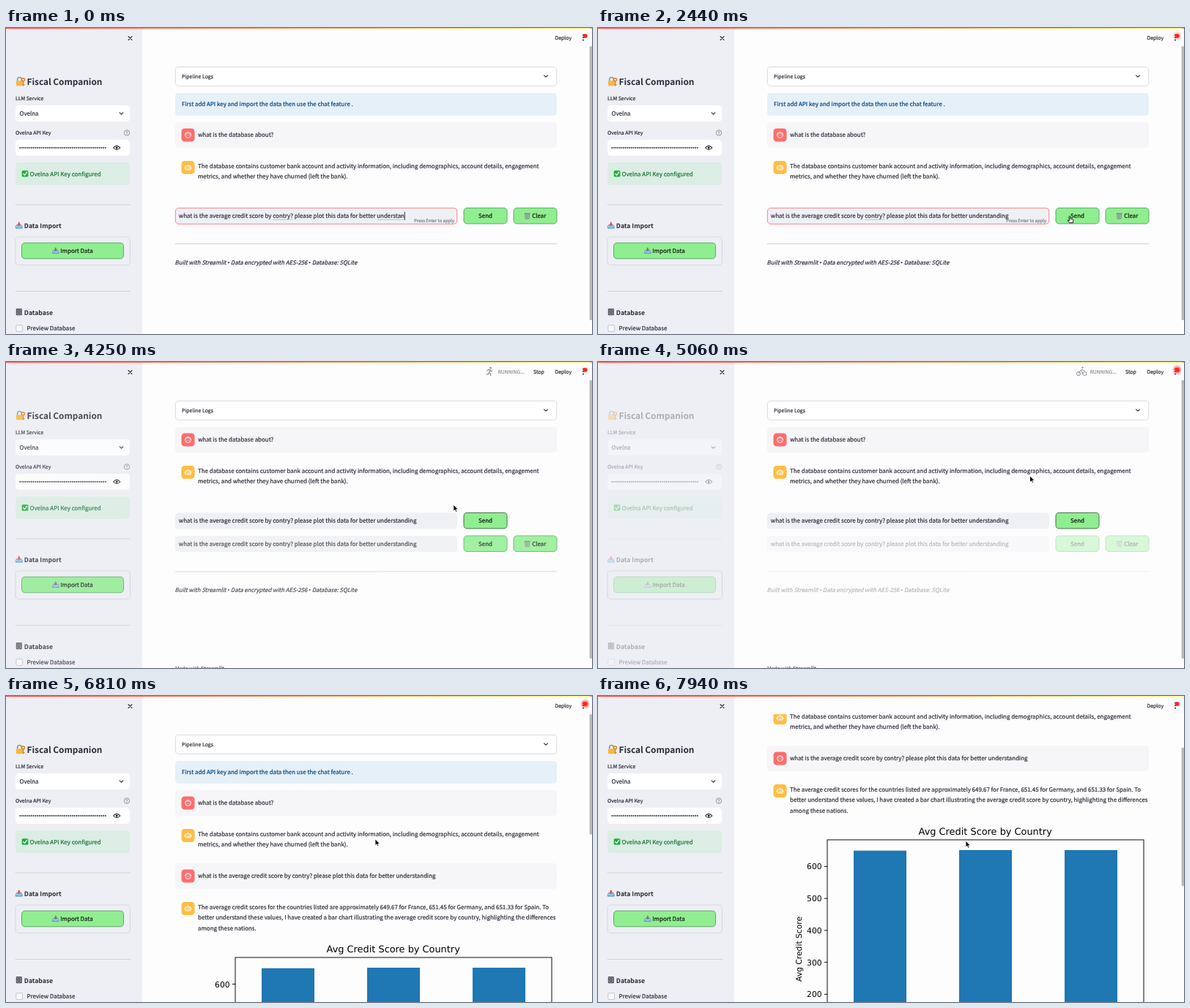
Write an HTML page that moves like this. It is 800 by 419 pixels and loops after 8000 ms.

```html
<!DOCTYPE html>
<html lang="en">
<head>
<meta charset="utf-8">
<title>Chat with a database</title>
<style>
  html, body { margin: 0; width: 100%; height: 100%; overflow: hidden; background: #fdfdfe; }
  svg { display: block; }
  text {
    font-family: "Noto Sans CJK JP", "Noto Sans CJK SC", "Noto Sans CJK", "Open Sans", sans-serif;
    color: #292b37; fill: currentColor; stroke: currentColor; stroke-width: .2px;
    white-space: pre; text-rendering: geometricPrecision;
  }
  .plot { font-family: "DejaVu Sans", sans-serif; color: #000; stroke: none; }
  .dot { font-family: "Open Sans", sans-serif; }
  .heading { font-weight: 600; stroke: none; }
</style>
</head>
<body>
<svg id="stage" width="800" height="419" viewBox="0 0 800 419"></svg>
<script>
const LOOP = 8000;
const QUESTION = 'what is the average credit score by contry? please plot this data for better ';
const INK = '#31333f', LINE = '#d0d2d7', FIELD = '#eff0f5', GREEN = '#3f9a48';

// Moments of the story, in ms
const BLUR = 2950, RUN = 3250, RERUN = 3600, DONE = 6150;
const KEYS = [[0, 'understan'], [1000, 'understand'], [1330, 'understandi'], [1480, 'understandin'], [1640, 'understanding']];
const SCROLL = [[6950, 0], [7440, 111], [7940, 161], [8000, 164]];
const POINTER = [[1750, 391, 272], [2400, 644, 257], [3650, 644, 257], [4700, 589.5, 156],
  [5600, 589.5, 156], [6500, 504, 196], [7000, 504, 196], [7300, 502, 198.5]];

// Drawing helpers
const label = (x, y, str, size = 7.95, attrs = '') =>
  `<text x="${x}" y="${y}" font-size="${size}" ${attrs}>${str}</text>`;
const box = (x, y, w, h, fill, stroke = 'none', r = 4.3) =>
  `<rect x="${x}" y="${y}" width="${w}" height="${h}" rx="${r}" fill="${fill}" stroke="${stroke}" stroke-width=".8"/>`;
const path = (d, stroke = INK, width = 1, fill = 'none') =>
  `<path d="${d}" stroke="${stroke}" stroke-width="${width}" fill="${fill}" stroke-linecap="round" stroke-linejoin="round"/>`;
const circle = (x, y, r, fill, stroke = 'none', width = 1) =>
  `<circle cx="${x}" cy="${y}" r="${r}" fill="${fill}" stroke="${stroke}" stroke-width="${width}"/>`;
const group = (id, body, attrs = '') => `<g ${id && `id="${id}"`} ${attrs}>${body}</g>`;
const at = (x, y, body, scale = 1) => `<g transform="translate(${x} ${y}) scale(${scale})">${body}</g>`;
const rule = (x1, x2, y) => path(`M${x1} ${y}H${x2}`, LINE);
const chevron = (x, y) => path(`M${x - 2.4} ${y - 1.2}l2.4 2.4l2.4 -2.4`, INK, 1.2);
const HEADING = 'class="heading"', MEDIUM = 'font-weight="500"';

// Pictograms on a 10 x 10 grid
const pictures = {
  lock: path('M2 5V3a2 2 0 0 1 4.4 0V5', '#8c979f', 1.2) + box(.6, 4.4, 7, 5.4, '#f6b93b', 'none', 1) +
    circle(8.1, 3.2, 1.5, 'none', '#d9822b', 1.1) + path('M8.1 4.9V9.4M8.1 8.6h1', '#d9822b', 1.1),
  tray: path('M1.8 4.4h6.4L9.8 6.4v2.8H.2V6.4z', '#3f7fb5', .6, '#78aedb') + path('M.6 6.6h2.5l.8 1h2.2l.8 -1h2.5', '#d6e8f6', .8) +
    path('M5 .9V3', '#e0402f', 1.6) + path('M3.2 3h3.6L5 5.1z', '#e0402f', .5, '#e0402f'),
  cabinet: box(.8, .3, 8.4, 9.4, '#3d424a', 'none', .8) + [1.2, 5.3].map(y =>
    box(1.8, y, 6.4, 3.4, '#8a919b', 'none', .3) + path(`M3.8 ${y + 1.5}h2.4`, '#24272d', .9)).join(''),
  bin: path('M1.5 2h7l-.9 7.6h-5.2z', '#70867c', .8, '#a9bdb2') + path('M3.6 3.4l.4 5M5 3.4v5M6.4 3.4l-.4 5', '#70867c', .5) + path('M1 1.7h8', '#5f746b', 1),
  check: box(.2, .2, 9.6, 9.6, '#1fae3f', 'none', 1.6) + path('M2.4 5.2l2 2.2L7.8 2.6', '#fff', 1.4)
};
const emoji = (name, x, y, size) => at(x, y, pictures[name], size / 10);

const button = (x, w, y, text, textX, icon = '', id = '') =>
  group(id, box(x, y, w, 21.6, '#90ee90'), `stroke="${GREEN}"`).replace('stroke="none"', '') +
  (icon && emoji(icon, textX - 11, y + 6.2, 9)) + label(textX, y + 13.7, text, 7.95, MEDIUM + ' style="color:#111"');

const face = circle(9, 9, 4.4, 'none', '#fff', 1) + path('M4.8 8.2q3 -.3 4 -2.8q1.6 2.6 4.4 2.5', '#fff', .9) +
  circle(7.3, 10.2, .65, '#fff') + circle(10.7, 10.2, .65, '#fff');
const robot = path('M5.4 6.6h7.2v5.8H5.4zM9 6.4V4.6M4 8.6v2M14 8.6v2M7.4 10.9h3.2', '#fff', 1) +
  circle(7.4, 8.7, .7, '#fff') + circle(10.6, 8.7, .7, '#fff');
const avatar = (y, color, icon) => at(239.5, y, box(0, 0, 18, 18, color) + at(.9, .9, icon, .9));
const userTurn = (y, text) => box(231, y, 521, 35, '#f6f6f8') + avatar(y + 8.5, '#ff6c6c', face) + label(262, y + 20.3, text);
const botTurn = (y, lines) => avatar(y, '#ffbd45', robot) + lines.map((s, i) => label(262, y + 10.1 + i * 14.3, s)).join('');

function chart() {
  const zero = 657, yOf = v => zero - v * .4375;
  const bars = [649.67, 651.45, 651.33].map((v, i) =>
    `<rect x="${349 + i * 144}" y="${yOf(v)}" width="72" height="${zero - yOf(v)}" fill="#1f77b4"/>`).join('');
  const ticks = [200, 300, 400, 500, 600].map(v => path(`M309.2 ${yOf(v)}H313`, '#000', .9) +
    label(305.6, yOf(v) + 4, v, 10.75, 'class="plot" text-anchor="end"')).join('');
  return label(528.7, 351, 'Avg Credit Score by Country', 12.9, 'class="plot" text-anchor="middle"') + bars + ticks +
    `<rect x="313" y="358" width="432" height="${zero - 358}" fill="none" stroke="#000" stroke-width=".95"/>` +
    label(0, 0, 'Avg Credit Score', 10.75, 'class="plot" text-anchor="middle" transform="translate(278 507.5) rotate(-90)"');
}

const sidebar = '<rect width="186" height="419" fill="#eeeff5"/>' +
  path('M167 11.5l5 5m0 -5l-5 5', INK, 1.1) + box(13, 286, 156.5, 38.5, 'none', LINE) +
  group('', emoji('lock', 13, 66.5, 13) + label(28.6, 77.8, 'Fiscal Companion', 11.8, HEADING) +
    label(13, 99.3, 'LLM Service', 6.95) + box(13, 106, 156, 22, '#fff') + label(18.5, 120.2, 'Ovelna') + chevron(157.5, 117) +
    label(13, 146.3, 'Ovelna API Key', 6.95) +
    circle(165, 143.5, 3.7, 'none', '#7c7e88', .8) + path('M163.9 142.7q.1 -1.1 1.1 -1.1t1.1 1q0 .7 -1.1 1.2v.4M165 145.6v.01', '#7c7e88', .7) +
    box(13, 153, 156, 22, '#fff') +
    '<path d="M19.2 164H137" stroke="#31333f" stroke-width="2" stroke-linecap="round" stroke-dasharray="0 2.65"/>' +
    path('M146.6 164q4.6 -5.4 9.2 0q-4.6 5.4 -9.2 0z', '#111', 1.1) + circle(151.2, 164, 1.5, '#111') +
    box(13, 184, 156, 31, '#dbede4') + emoji('check', 21.5, 195, 9) + label(32.6, 202.8, 'Ovelna API Key configured', 7.95, 'style="color:#177233"') +
    rule(13, 169.5, 242) + emoji('tray', 13, 265.5, 9.5) + label(24.8, 274, 'Data Import', 8.6, HEADING) +
    button(21.5, 139, 294.2, 'Import Data', 74.3, 'tray') +
    rule(13, 169.5, 360.5) + emoji('cabinet', 13, 384, 9.5) + label(24.8, 392.6, 'Database', 8.6, HEADING) +
    box(13.8, 406.8, 8.8, 8.8, '#f8f9fb', '#b4b6be', 1.8) + label(28.5, 414.3, 'Preview Database'), 'class="stale"');

const page = box(231.3, 53.3, 520.4, 26.2, '#fff', LINE) + label(240, 69, 'Pipeline Logs', 6.95) + chevron(737, 66) +
  group('info', box(231, 89, 521, 31, '#e6f0f9') +
    label(240, 107.4, 'First add API key and import the data then use the chat feature .', 7.95, 'style="color:#004280"')) +
  group('chat', userTurn(129, 'what is the database about?') + botTurn(182, [
    'The database contains customer bank account and activity information, including demographics, account details, engagement',
    'metrics, and whether they have churned (left the bank).'])) +
  group('row', box(231, 246.5, 385, 22, FIELD) + label(235.8, 260.3, '', 7.95, 'id="typed"') +
    group('focus', box(231.3, 246.6, 384.4, 21.8, 'none', '#ff6a68') +
      label(612, 266, 'Press Enter to apply', 5.93, 'text-anchor="end" style="color:#777984"') +
      path('M364.5 262.4H390', '#999', .5) + group('misspelt', path('M507 262.4H544.5', '#999', .5)) +
      '<path id="caret" d="M0 251.5V263" stroke="#111" stroke-width=".8"/>') +
    button(625, 59, 246.4, 'Send', 645, '', 'send') + group('clear', button(693, 59, 246.4, 'Clear', 718.2, 'bin'))) +
  group('oldRow', box(231, 238, 385, 22, FIELD) + label(235.8, 251.8, QUESTION + 'understanding') +
    button(625, 59, 237.9, 'Send', 645) + button(693, 59, 237.9, 'Clear', 718.2, 'bin'), 'class="stale"') +
  group('foot', group('', rule(231, 752, 295.5) + label(230.6, 323.8,
    'Built with Streamlit <tspan class="dot">•</tspan> Data encrypted with AES-256 <tspan class="dot">•</tspan> Database: SQLite',
    7.78, 'font-style="italic"'), 'class="stale"')) +
  group('made', label(231, 421.5, 'Made with <tspan font-weight="600">Streamlit</tspan>', 6.95, 'style="color:#7b7d86"')) +
  group('answer', userTurn(229, QUESTION + 'understanding') + botTurn(282, [
    'The average credit scores for the countries listed are approximately 649.67 for France, 651.45 for Germany, and 651.33 for Spain. To',
    'better understand these values, I have created a bar chart illustrating the average credit score by country, highlighting the differences',
    'among these nations.']) + chart());

const GREY = '#8d8f97';
const athletes = [
  circle(660, 8.4, 1.3, GREY) + path('M655.8 11h8.4M660 11v4M658.6 11.5v7M661.4 11.5v7', GREY, 1.3),
  circle(656, 16, 2.6, 'none', GREY, 1) + circle(664.4, 16, 2.6, 'none', GREY, 1) +
    circle(661.6, 7.6, 1.2, GREY) + path('M656 16l3 -4.6l2 -1.4l1.4 1.8h2M659 11.4l2 2v3', GREY, 1),
  circle(661.6, 8, 1.3, GREY) + path('M657 11.6l2.4 -1.4l1.4 .6l1.2 1.8h2M660.6 11l-1 3.6l2 1.4v2.6M659.4 14.6l-1 2l-2.4 .4', GREY, 1.2)
];
const header = '<rect x="186" width="614" height="25" fill="#fdfdfe"/>' +
  group('running', athletes.map(a => group('', a, 'class="athlete"')).join('') +
    label(671.5, 15.7, 'RUNNING...', 6.8, `style="color:${GREY}"`) + label(720, 15.7, 'Stop', 6.9)) +
  label(749.5, 15.7, 'Deploy', 6.9) + [9.6, 13, 16.4].map(y => circle(788, y, 1, '#30202a')).join('') +
  '<circle id="glow" cx="790.8" cy="10.8" r="7.5" fill="url(#halo)"/>' + circle(790.8, 10.8, 2.9, '#fb2323') +
  '<rect width="800" height="1.1" fill="url(#strip)"/>';

const pointer = group('pointer',
  group('arrow', path('M0 0V8.6L2 6.8L3.4 9.8L4.9 9.1L3.6 6.3H6.2z', '#fff', .8, '#000')) +
  group('hand', path('M-.8 1q.8 -1.2 1.6 0v3.2l3.2 .8q1 .4 .8 1.6l-.6 3.2h-4.4l-2.6 -3.4q.2 -1.2 2 .2z', '#000', .9, '#fff')));

document.getElementById('stage').innerHTML = `<defs>
  <linearGradient id="strip"><stop stop-color="#ff4b4b"/><stop offset="1" stop-color="#fffd80"/></linearGradient>
  <radialGradient id="halo"><stop offset=".3" stop-color="#ff2a2a" stop-opacity=".8"/><stop offset="1" stop-color="#ff5a5a" stop-opacity="0"/></radialGradient>
  </defs><rect width="800" height="419" fill="#fdfdfe"/>` + group('page', page) + sidebar + header +
  '<rect id="thumb" x="796.6" width="5" rx="1.5" fill="#b9b9bb"/>' +
  '<rect x="796" y="1.1" width="4" height="23.9" fill="#fdfdfe"/>' + pointer;

const $ = id => document.getElementById(id);
const show = (id, on) => $(id).setAttribute('display', on ? 'inline' : 'none');
const move = (id, x, y) => $(id).setAttribute('transform', `translate(${x} ${y})`);
const ramp = (t, a, b) => Math.min(1, Math.max(0, (t - a) / (b - a)));
const smooth = p => p * p * (3 - 2 * p);

function follow(track, t, ease = p => p) {
  const next = track.findIndex(step => step[0] > t);
  if (next < 0) return track.at(-1).slice(1);
  if (next === 0) return track[0].slice(1);
  const a = track[next - 1], b = track[next];
  const p = ease(ramp(t, a[0], b[0]));
  return a.slice(1).map((v, k) => v + (b[k + 1] - v) * p);
}

function render(t) {
  const rerun = t >= RERUN && t < DONE, done = t >= DONE, lift = rerun ? -40 : 0;
  const [scroll] = follow(SCROLL, t);
  move('page', 0, -scroll);
  move('chat', 0, lift);
  move('row', 0, lift);
  move('foot', 0, rerun ? -8.5 : 0);
  show('info', !rerun);
  show('row', !done);
  show('clear', !rerun);
  show('oldRow', rerun);
  show('foot', !done);
  show('made', rerun);
  show('answer', done);
  $('send').setAttribute('stroke', rerun ? '#1d5224' : GREEN);

  const [pressed, word] = KEYS.filter(k => k[0] <= t).at(-1);
  const typed = $('typed');
  if (typed.textContent !== QUESTION + word) typed.textContent = QUESTION + word;
  show('focus', t < BLUR);
  show('misspelt', t < KEYS[1][0]);
  show('caret', (t - pressed) % 1000 < 500);
  if (t < BLUR) move('caret', 236.2 + typed.getComputedTextLength(), 0);

  const fade = done ? 0 : ramp(t, RUN + 500, RUN + 1500) ** 2;
  document.querySelectorAll('.stale').forEach(el => el.setAttribute('opacity', 1 - .67 * fade));
  $('running').setAttribute('opacity', ramp(t, RUN, RUN + 400) * (1 - ramp(t, DONE, DONE + 150)));
  const pose = Math.floor(Math.max(0, t - RUN) / 420) % athletes.length;
  document.querySelectorAll('.athlete').forEach((el, i) => el.setAttribute('display', i === pose ? 'inline' : 'none'));

  $('thumb').setAttribute('y', scroll * .44);
  $('thumb').setAttribute('height', done ? 189.5 : rerun ? 406 : 400);
  $('glow').setAttribute('opacity', (1 - Math.cos(t * Math.PI / 1000)) / 2);

  const [x, y] = follow(POINTER, t, smooth);
  const overSend = !done && x > 625 && x < 684 && y > 246 + lift && y < 268 + lift;
  show('pointer', t >= POINTER[0][0]);
  show('hand', overSend);
  show('arrow', !overSend);
  move('pointer', x, y);
}

const start = performance.now();
function tick() {
  render((performance.now() - start) % LOOP);
  requestAnimationFrame(tick);
}
tick();
</script>
</body>
</html>
```
